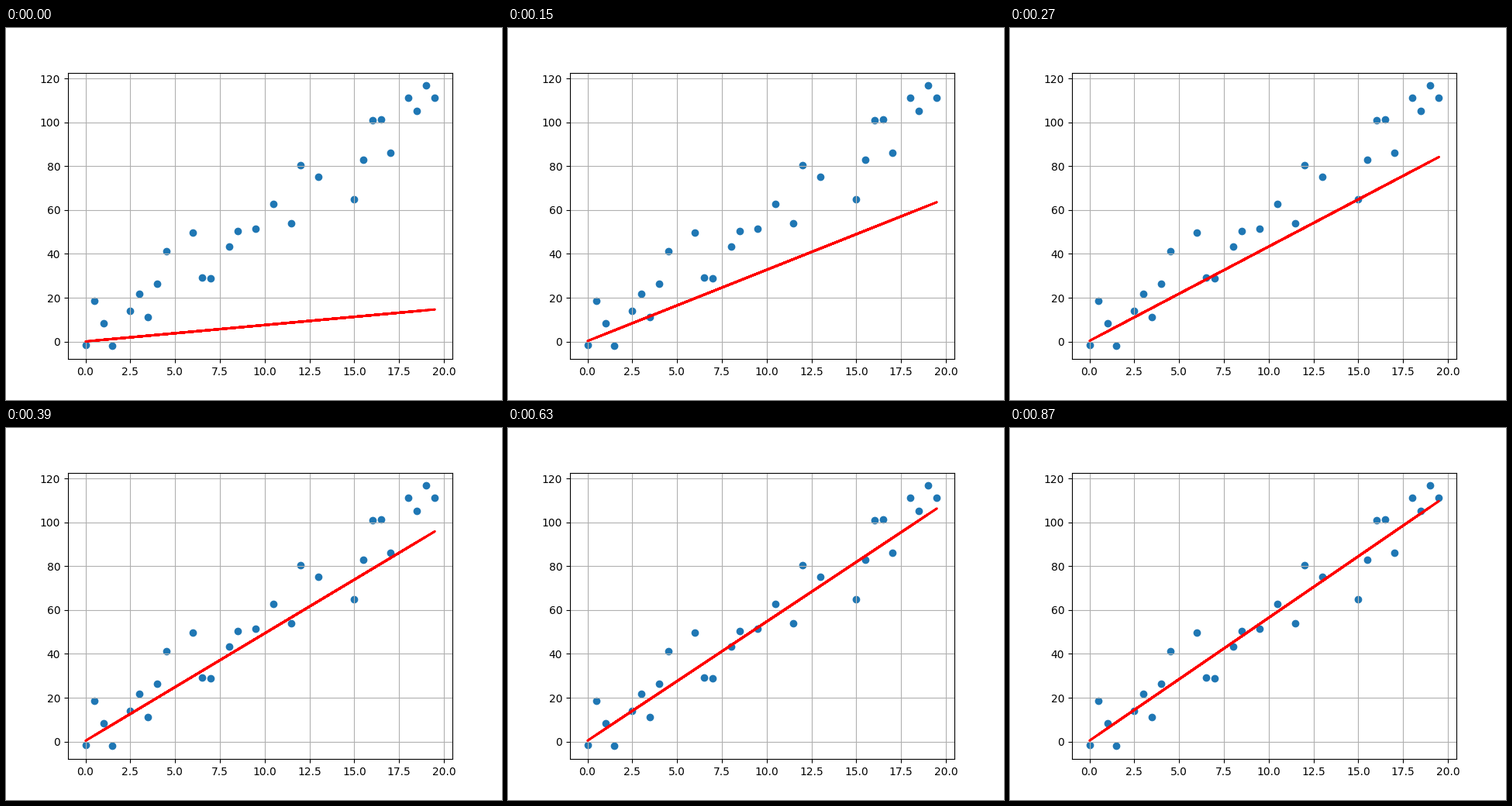
A matplotlib script that plays this animation: 640x480 px, repeating every 900 ms.

```python
import numpy as np
import matplotlib.pyplot as plt
from matplotlib.animation import FuncAnimation

FRAMES = 30
RATE = 0.001
TREND = 5.7
STEP = 0.5

# Where the samples swing away from the trend: {sample index: deviation}.
BENDS = {0: -1.4, 1: 15.7, 3: -10.6, 6: 4.7, 7: -8.7, 9: 15.6, 12: 15.5,
         13: -7.9, 14: -11, 17: 2, 19: -2.7, 21: 3, 23: -11.5, 24: 12.1,
         30: -20.6, 32: 9.8, 33: 7.2, 34: -10.8, 36: 8.6, 37: -0.2,
         38: 8.45, 39: 0}
BETWEEN = [2, 5, 8, 16, 26, 31]


def make_samples():
    """Scattered samples, in random order so the line retraces itself."""
    index = np.random.default_rng(4).permutation([*BENDS, *BETWEEN])
    x = STEP * index
    swing = np.interp(index, list(BENDS), list(BENDS.values()))
    return x, TREND * x + swing


def descend(x, y, steps):
    """Slope and intercept after each step of gradient descent."""
    slope = bias = 0.0
    fits = []
    for _ in range(steps):
        error = slope * x + bias - y
        slope -= RATE * np.mean(error * x)
        bias -= RATE * np.mean(error)
        fits.append((slope, bias))
    return fits


x, y = make_samples()
fits = descend(x, y, FRAMES)

fig, ax = plt.subplots(figsize=(6.4, 4.8), dpi=100)
ax.scatter(x, y)
ax.grid(True)
ax.set_xlim(ax.get_xlim())
ax.set_ylim(ax.get_ylim())
line, = ax.plot([], [], color="red", linewidth=2)


def update(i):
    slope, bias = fits[i]
    line.set_data(x, slope * x + bias)
    return line,


anim = FuncAnimation(fig, update, frames=FRAMES, interval=30, repeat=True,
                     repeat_delay=0)
plt.show()
```
